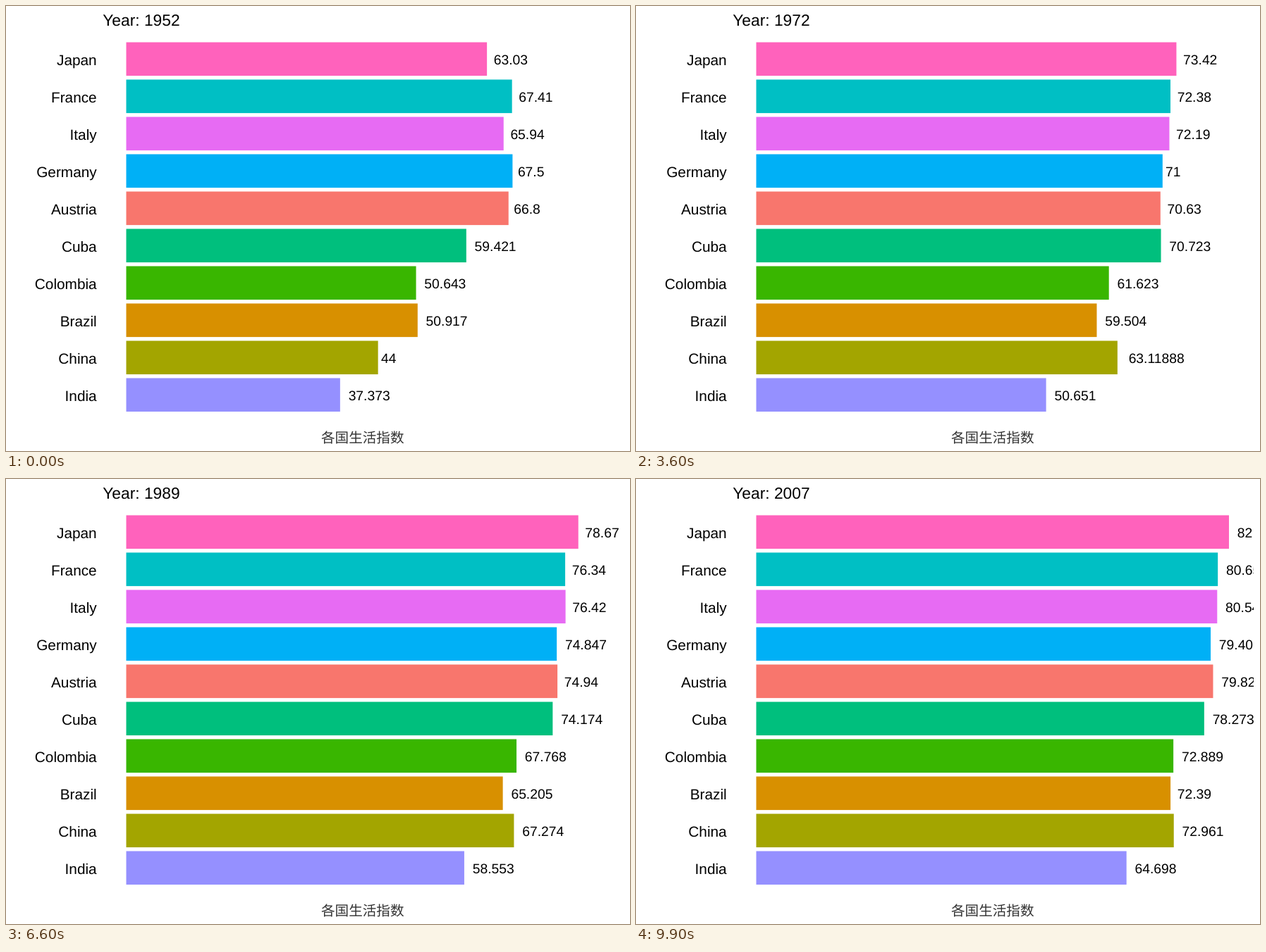
These frames come from a looping animation (885x632 px, 10000 ms). An HTML page:

```html
<!DOCTYPE html>
<html lang="en">
<head>
<meta charset="utf-8">
<title>Bar chart by year</title>
<style>
  html, body { margin: 0; width: 100%; height: 100%; overflow: hidden; background: #fff; }
  svg { display: block; width: 885px; height: 632px; }
  text { font-family: "Liberation Sans", Arial, sans-serif; text-rendering: geometricPrecision; fill: #000; }
  .year { font-size: 22.8px; }
  .name { font-size: 20.8px; text-anchor: end; }
  .value { font-size: 19.3px; }
  .caption { font: 300 19.6px "Noto Sans CJK SC", "Noto Sans CJK", sans-serif; fill: #333; }
</style>
</head>
<body>
<svg viewBox="0 0 885 632" xmlns="http://www.w3.org/2000/svg">
  <defs><clipPath id="panel"><rect width="876" height="632"/></clipPath></defs>
  <text class="year" x="137.2" y="28.3"></text>
  <g id="bars" clip-path="url(#panel)"></g>
  <text class="caption" lang="zh-CN" x="447" y="619.5">各国生活指数</text>
</svg>
<script>
// Key values at these years; the surveys between them, five years apart, lie on straight lines.
const KEY_YEARS = [1952, 1957, 1962, 1972, 1987, 2007];
const countries = [
  ["Japan", "#FF62BC", 2, [63.03, 65.5, 68.73, 73.42, 78.67, 82.603]],
  ["France", "#00BFC4", 2, [67.41, 68.93, 70.51, 72.38, 76.34, 80.657]],
  ["Italy", "#E76BF3", 2, [65.94, 67.81, 69.24, 72.19, 76.42, 80.546]],
  ["Germany", "#00B0F6", 2, [67.5, 69.1, 70.3, 71, 74.847, 79.406]],
  ["Austria", "#F8766D", 2, [66.8, 67.48, 69.54, 70.63, 74.94, 79.829]],
  ["Cuba", "#00BF7D", 3, [59.421, 62.325, 65.246, 70.723, 74.174, 78.273]],
  ["Colombia", "#39B600", 3, [50.643, 55.118, 57.863, 61.623, 67.768, 72.889]],
  ["Brazil", "#D89000", 3, [50.917, 53.285, 55.665, 59.504, 65.205, 72.39]],
  ["China", "#A3A500", 3, [44, 50.54896, 44.50136, 63.11888, 67.274, 72.961]],
  ["India", "#9590FF", 3, [37.373, 40.249, 43.605, 50.651, 58.553, 64.698]]
];
const LEFT = 170.5, TOP = 51.5, PITCH = 53, BAR = 47.6, UNIT = 8.117;
const FIRST = 1952, LAST = 2007, GAP = 5;
const STEP_MS = 100, STEPS = 100;

const bars = document.getElementById("bars");
const year = document.querySelector(".year");

function add(tag, attrs, text = "") {
  const el = document.createElementNS("http://www.w3.org/2000/svg", tag);
  for (const key in attrs) el.setAttribute(key, attrs[key]);
  el.textContent = text;
  return bars.appendChild(el);
}

const mix = (a, b, t) => a + (b - a) * t;

function survey(keys, digits, when) {
  const k = KEY_YEARS.findIndex(y => y >= when);
  if (KEY_YEARS[k] === when) return keys[k];
  const t = (when - KEY_YEARS[k - 1]) / (KEY_YEARS[k] - KEY_YEARS[k - 1]);
  return +mix(keys[k - 1], keys[k], t).toFixed(digits);
}

const rows = countries.map(([name, fill, digits, keys], i) => {
  const y = TOP + i * PITCH;
  add("text", { class: "name", x: 128.7, y: y + 32.2 }, name);
  return {
    at: when => survey(keys, digits, when),
    bar: add("rect", { x: LEFT, y, height: BAR, fill }),
    value: add("text", { class: "value", y: y + 31.3 })
  };
});

function draw(step) {
  const now = mix(FIRST, LAST, step / (STEPS - 1));
  const pos = (now - FIRST) / GAP;
  const from = Math.min(FIRST + Math.floor(pos) * GAP, LAST - GAP);
  const nearest = FIRST + Math.round(pos) * GAP;
  year.textContent = "Year: " + Math.round(now);
  for (const { at, bar, value } of rows) {
    const width = UNIT * mix(at(from), at(from + GAP), (now - from) / GAP);
    bar.setAttribute("width", width);
    value.textContent = at(nearest);
    // The gap grows with the length of the label.
    value.setAttribute("x", LEFT + width + 0.2 * value.getComputedTextLength());
  }
}

const start = performance.now();
let shown = -1;
function tick() {
  const step = Math.floor((performance.now() - start) / STEP_MS) % STEPS;
  if (step !== shown) draw(shown = step);
  requestAnimationFrame(tick);
}
tick();
</script>
</body>
</html>
```
